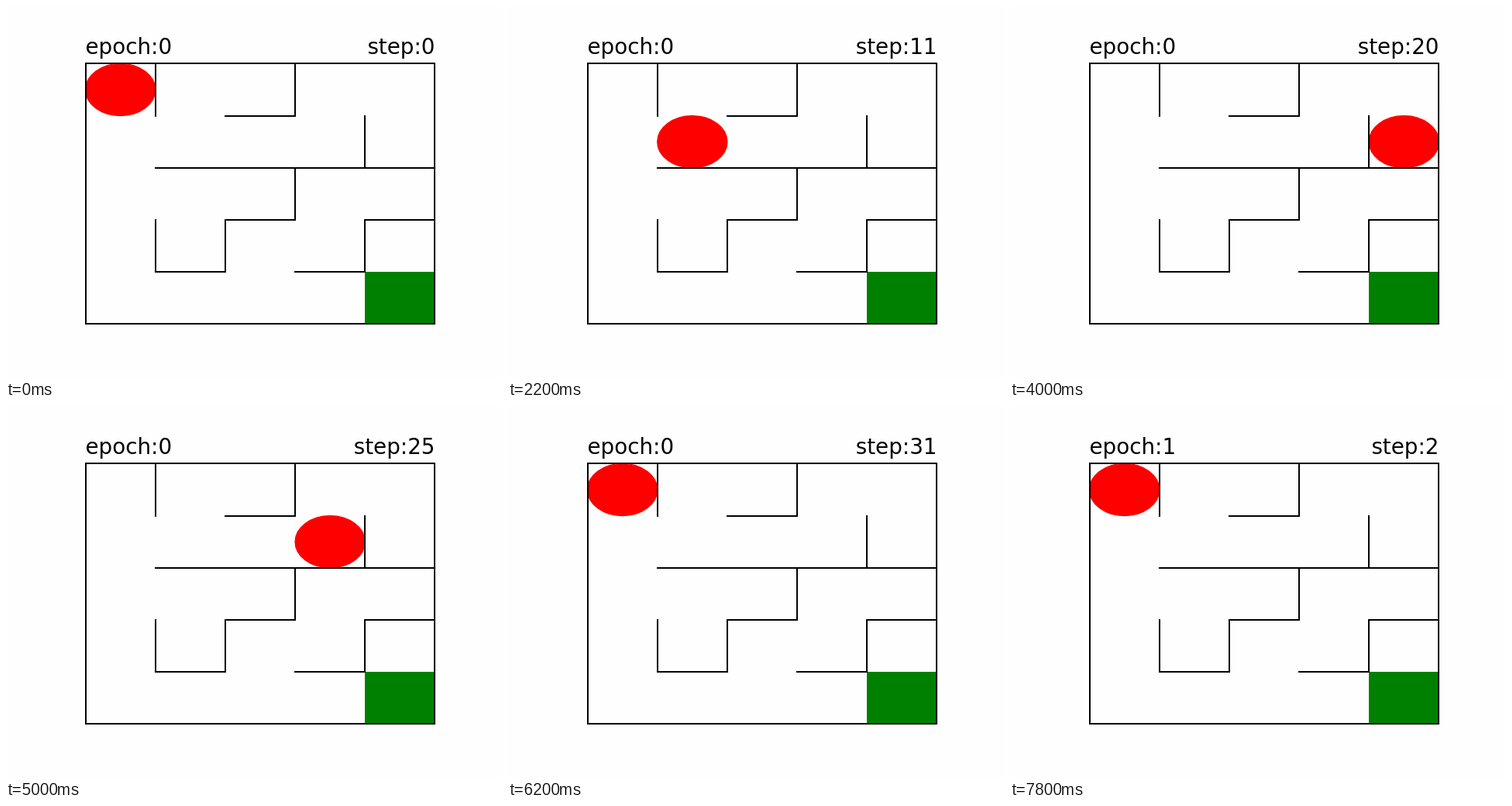
An HTML page that plays this animation: 640 px wide and 480 px high, repeating every 8000 ms.

```html
<!DOCTYPE html>
<html lang="en">
<head>
<meta charset="utf-8">
<title>Maze walk</title>
<style>
  html, body { margin: 0; width: 100%; height: 100%; overflow: hidden; background: #fefefe; }
  svg { display: block; width: 640px; height: 480px; }
  text { font: 27.78px "DejaVu Sans", sans-serif; }
</style>
</head>
<body>
<svg viewBox="0 0 640 480">
  <rect x="463" y="343" width="91" height="68" fill="green"/>
  <ellipse id="agent" rx="45.1" ry="33.6" fill="red" stroke="red" stroke-width="1.39"/>
  <path fill="none" stroke="#000" stroke-width="2" stroke-linecap="square" d="
    M103 74H553V410H103Z
    M193 74V142
    M283 142H373V74
    M463 142V209
    M193 209H553
    M373 209V276H283V343H193V276
    M373 343H463V276H553"/>
  <text id="epoch" x="102.5" y="62"></text>
  <text id="step" x="553.5" y="62" text-anchor="end"></text>
</svg>
<script>
const STEP_MS = 200, LOOP_MS = 8000;
const LEFT = 102.55, TOP = 74.4, CELL_W = 90.18, CELL_H = 67.2;
const DIRECTIONS = { U: [0, -1], D: [0, 1], L: [-1, 0], R: [1, 0], '.': [0, 0] };

// One letter per step; a dot is a bump into a wall.
const EPOCHS = ['..DRUR...LDR.R.UR.D...ULDL.LL.U.D.D.', '..'];

const states = EPOCHS.flatMap((moves, epoch) => {
  let col = 0, row = 0;
  const visited = [...moves].map((move, i) => {
    const [dx, dy] = DIRECTIONS[move];
    col += dx;
    row += dy;
    return { epoch, step: i + 1, col, row };
  });
  return [{ epoch, step: 0, col: 0, row: 0 }, ...visited];
});

const byId = id => document.getElementById(id);
const agent = byId('agent'), epochLabel = byId('epoch'), stepLabel = byId('step');
let shown;

function draw(now) {
  const state = states[Math.floor(now % LOOP_MS / STEP_MS)];
  if (state !== shown) {
    shown = state;
    agent.setAttribute('cx', LEFT + (state.col + 0.5) * CELL_W);
    agent.setAttribute('cy', TOP + (state.row + 0.5) * CELL_H);
    epochLabel.textContent = 'epoch:' + state.epoch;
    stepLabel.textContent = 'step:' + state.step;
  }
}

const start = performance.now();
function tick() {
  draw(performance.now() - start);
  requestAnimationFrame(tick);
}
tick();
</script>
</body>
</html>
```
